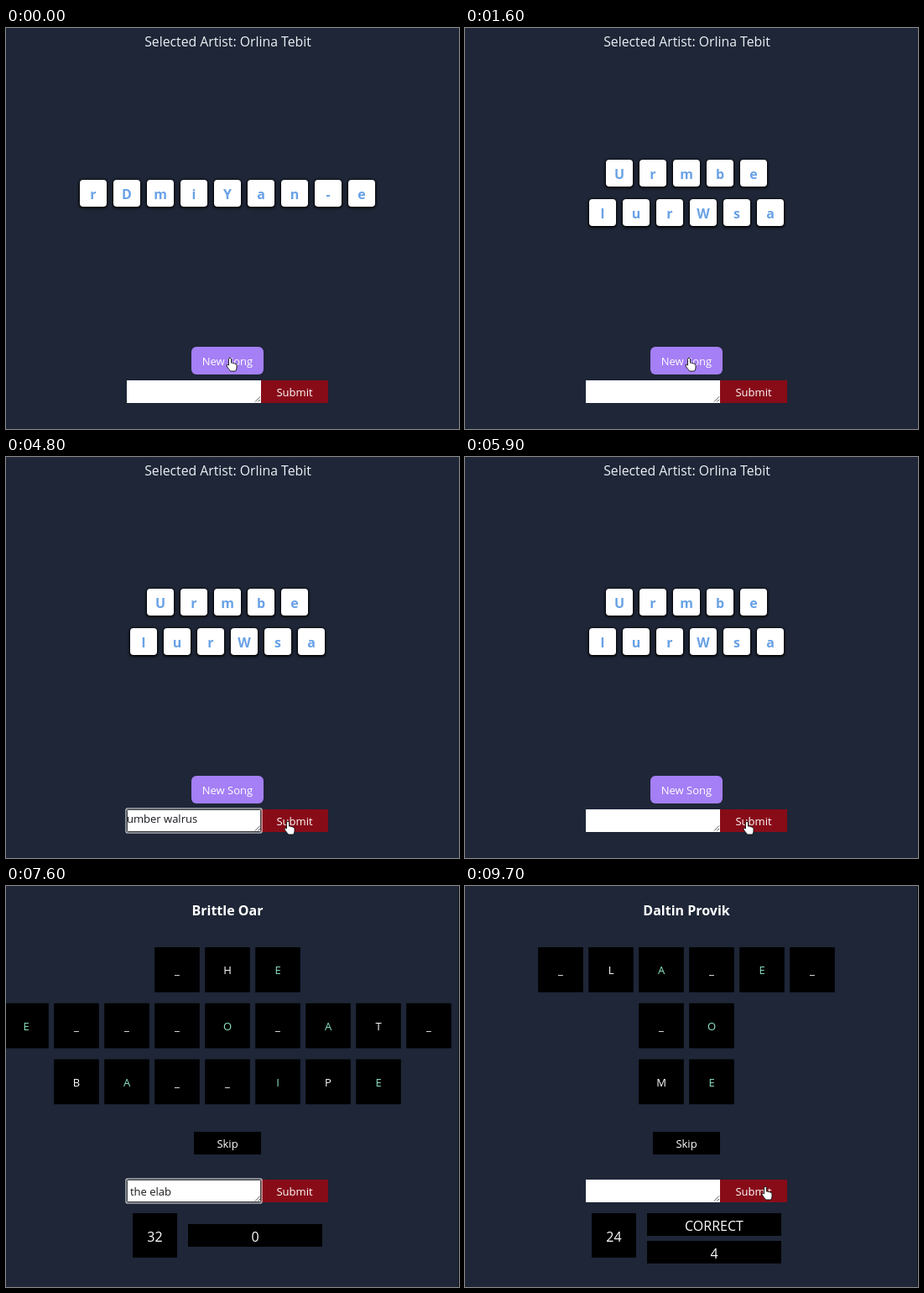
Write an HTML page that moves like this. It is 540x478 px and loops after 9800 ms.

```html
<!DOCTYPE html>
<html lang="en">
<head>
<meta charset="utf-8">
<title>Song guessing game</title>
<style>
html, body { margin: 0; width: 100%; height: 100%; overflow: hidden; background: #1e2637; }
svg { display: block; width: 540px; height: 478px; }
text { font-family: "Open Sans", "Noto Sans", sans-serif; font-size: 13px; fill: #fff; }
.mid { text-anchor: middle; }
.head { font-size: 15.8px; fill: #eef1f6; }
.name { font-size: 16px; font-weight: 700; }
.big { font-size: 16px; }
.letter { font-size: 16px; font-weight: 700; fill: #68a1e6; }
.vowel { fill: #8ee3c1; }
.typed { fill: #16181d; }
.tile { fill: #fff; filter: drop-shadow(0 1px 1.5px #000) drop-shadow(0 0 1px #000); }
</style>
</head>
<body>
<svg id="stage" viewBox="0 0 540 478"></svg>
<script>
const LOOP = 9800, STEP = 100, CUT = 6100;
const NEXT_SONG = 1200, FOCUS = 2700, SEND = 4900;
const TYPE2 = 7100, SEND2 = 9500;
const FIRST = ["rDmiYan-e"], SECOND = ["Urmbe", "lurWsa"];
const GUESS = "umber walrus", GUESS2 = "the elaborate bagpipe";
const BOARD = ["_HE", "E___O_AT_", "BA__IPE"], BOARD2 = ["_LA_E_", "_O", "ME"];
const stage = document.getElementById("stage");

const rect = (x, y, w, h, fill, extra = "") =>
  `<rect x="${x}" y="${y}" width="${w}" height="${h}" fill="${fill}" ${extra}/>`;
const text = (x, y, s, cls = "mid") => `<text x="${x}" y="${y}" class="${cls}">${s}</text>`;

// Piecewise linear value from [time, value...] points
function track(points, t) {
  if (t <= points[0][0]) return points[0].slice(1);
  for (let i = 1; i < points.length; i++) {
    const a = points[i - 1], b = points[i];
    if (t <= b[0]) {
      const k = (t - a[0]) / (b[0] - a[0]);
      return a.slice(1).map((v, j) => v + (b[j + 1] - v) * k);
    }
  }
  return points[points.length - 1].slice(1);
}

function hand(x, y) {
  return `<path transform="translate(${x} ${y})" fill="#fff" stroke="#111" stroke-width=".9" stroke-linejoin="round"
    d="M-1.5 8V1Q-1.5-.8 0-.8T1.5 1V5.2Q3 4.4 3.8 5.8Q5.4 5 6 6.4Q8 6 8 8V11Q8 13 6.6 15H.6Q-1-.0-1 12.4L-4 9Q-4.4 7-2.6 7.4Z"/>`
    .replace("Q-1-.0-1 12.4", "Q-.4 13.6-1.4 12.4");
}

function beam(x, y) {
  const d = `M${x - 3} ${y - 5.5}h2.2l.8.8l.8-.8h2.2M${x} ${y - 5}v10M${x - 3} ${y + 5.5}h2.2l.8-.8l.8.8h2.2`;
  return `<path d="${d}" fill="none" stroke="#77797e" stroke-width="1.1"/>`;
}

function form(y, typed, focused, textX, textY, caret) {
  let s = rect(304, y, 80, 27, "#880c18") + rect(144, y, 160, 27, "#fff");
  if (focused) {
    s += rect(143, y - 1, 162, 29, "none", 'stroke="#fff" rx="1"') +
      rect(144.3, y + .3, 159.4, 26.4, "none", 'stroke="#15171c" rx="1"');
  }
  s += `<path d="M297 ${y + 25.5}l6-6M300.5 ${y + 25.5}l2.5-2.5" stroke="#555" fill="none"/>`;
  if (caret) s += rect(147, y + 5, 1, 17, "#111");
  return s + text(textX, y + textY, typed, "typed") + text(344, y + 19, "Submit");
}

function whiteTiles(rows) {
  const top = rows.length > 1 ? 157 : 181;
  return rows.map((row, r) => [...row].map((ch, i) => {
    const cx = 264 + (i - (row.length - 1) / 2) * 40, y = top + r * 47;
    return rect(cx - 16, y, 32, 32, "#fff", 'rx="4" class="tile"') + text(cx, y + 23, ch, "mid letter");
  }).join("")).join("");
}

function blackTiles(rows) {
  return rows.map((row, r) => [...row].map((ch, i) => {
    const cx = 264 + (i - (row.length - 1) / 2) * 60, y = 73 + r * 66.8;
    return rect(cx - 26.8, y, 53.6, 53.6, "#000") +
      text(cx, y + 32, ch, "AEIOU".includes(ch) ? "mid vowel" : "mid");
  }).join("")).join("");
}

function scramble(t) {
  const count = t < SEND ? Math.floor(track([[3000, 0], [4000, 12]], t)[0]) : 0;
  const [x, y] = track([[2000, 267, 394], [2600, 234, 437], [4100, 234, 437], [4700, 336, 435]], t);
  const hidden = t > 3000 && t < 4100;
  const pointer = hidden ? "" : y < 413 || x > 304 ? hand(x, y) : beam(x, y);
  return text(264.5, 22, "Selected Artist: Orlina Tebit", "mid head") +
    whiteTiles(t < NEXT_SONG ? FIRST : SECOND) +
    rect(221, 380, 86, 33, "#a57ff5", 'rx="6"') + text(264, 402, "New Song") +
    form(420, GUESS.slice(0, count), t >= FOCUS && t < SEND, 144, 16, false) + pointer;
}

function blanks(t) {
  const done = t >= SEND2;
  const count = done ? 0 : Math.floor(track([[TYPE2 - 100, 0], [8200, 16], [8400, 18], [8800, 21]], t)[0]);
  const [x, y] = track([[8900, 221, 352], [9000, 270, 355], [9100, 286, 356], [9400, 358, 359]], t);
  const hidden = t >= TYPE2 && t < 9000;
  const pointer = hidden ? "" : x > 304 ? hand(x, y) : beam(x, y);
  const clock = 38 - Math.floor((t - 6000) / 250);
  const score = done
    ? rect(217, 390, 160, 27, "#000") + text(297, 411, "CORRECT", "mid big") +
      rect(217, 423, 160, 27, "#000") + text(297, 444, "4", "mid big")
    : rect(217, 403, 160, 27, "#000") + text(297, 424, "0", "mid big");
  return rect(539, 0, 1, 478, "#10141d") +
    text(264, 35, done ? "Daltin Provik" : "Brittle Oar", "mid name") +
    blackTiles(done ? BOARD2 : BOARD) +
    rect(224, 293, 80, 27, "#000") + text(264, 312, "Skip") +
    form(350, GUESS2.slice(0, count), !done, 148, 19, t < 6400) +
    rect(151, 390, 53, 53, "#000") + text(177.5, 424, clock, "mid big") + score + pointer;
}

let shown = -1;
function draw(now) {
  const t = Math.floor((now % LOOP) / STEP) * STEP;
  if (t !== shown) {
    shown = t;
    stage.innerHTML = rect(0, 0, 540, 478, "#1e2637") + (t < CUT ? scramble(t) : blanks(t));
  }
}

const start = performance.now();
function tick() {
  draw(performance.now() - start);
  requestAnimationFrame(tick);
}
tick();
</script>
</body>
</html>
```
